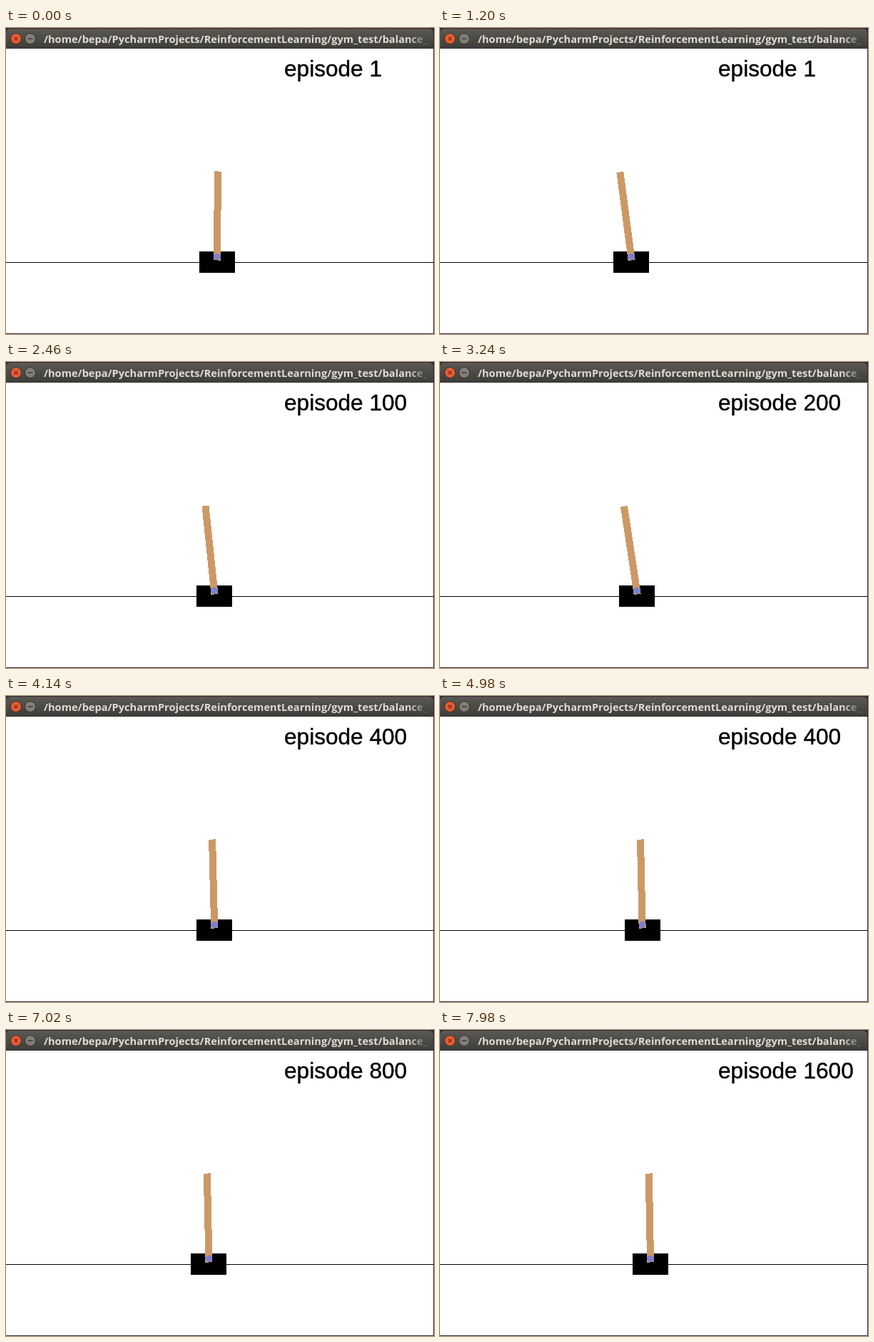
An HTML page that plays this animation: 600 by 430 pixels, repeating every 8 s.

```html
<!DOCTYPE html>
<html lang="en">
<head>
<meta charset="utf-8">
<title>Cart pole training</title>
<style>
  html, body { margin: 0; width: 100%; height: 100%; overflow: hidden; background: #fff; }
  svg { display: block; width: 600px; height: 430px; }
  .path { font: bold 14.6px "Open Sans", "Noto Sans", sans-serif; fill: #dfdbd2; }
  #label { font: 31.6px "Liberation Sans", Arial, sans-serif; stroke: #000; stroke-width: .4px; }
</style>
</head>
<body>
<svg viewBox="0 0 600 430">
  <defs>
    <linearGradient id="bar" x2="0" y2="1">
      <stop offset="0" stop-color="#5b5953"/>
      <stop offset="1" stop-color="#3d3c38"/>
    </linearGradient>
    <linearGradient id="fade">
      <stop offset=".94" stop-color="#fff"/>
      <stop offset=".992" stop-color="#000"/>
    </linearGradient>
    <mask id="fadeOut"><rect width="600" height="29" fill="url(#fade)"/></mask>
  </defs>

  <rect width="600" height="430" fill="#fff"/>

  <!-- Window frame -->
  <rect width="600" height="29" fill="#35242e"/>
  <path d="M0 29V7Q0 1 6 1H593Q599 1 599 7V29Z" fill="url(#bar)"/>
  <path d="M0 28.5H600" stroke="#33322e"/>
  <path d="M599.5 29V429.5H0" fill="none" stroke="#3b2a35"/>
  <g stroke="#33322e">
    <circle cx="14" cy="15" r="7.5" fill="#ec5b31"/>
    <path d="M11.5 12.5l5 5m0-5l-5 5" stroke="#7a2f18" stroke-width="1.3"/>
    <circle cx="34" cy="15" r="7.5" fill="#817e75"/>
    <path d="M30.5 15h7" stroke-width="1.3"/>
  </g>
  <g mask="url(#fadeOut)">
    <text class="path" x="53" y="21">/home/bepa/PycharmProjects/ReinforcementLearning/gym_test/balance_</text>
  </g>

  <text id="label" x="390" y="68"></text>

  <!-- Scene -->
  <g shape-rendering="crispEdges">
    <rect y="329" width="599" height="1"/>
    <g id="cart">
      <rect x="-25" y="314" width="50" height="30"/>
      <g id="pole">
        <rect x="-5" y="201.5" width="10" height="125" fill="#cc9966"/>
        <circle cy="321.5" r="5" fill="#8080cc"/>
      </g>
    </g>
  </g>
</svg>

<script>
const LOOP = 8000, STEP = 60, AXLE_Y = 321.5, SWAY_PERIOD = 15.5;

// The cart drifts between two positions; "fall" is how far the pole tips in radians.
// Episodes without a fall keep the pole balanced.
const episodes = [
  { number: 1, start: 0, from: 296, to: 254.5, fall: -.205 },
  { number: 10, start: 27, from: 297, to: 292, fall: -.205 },
  { number: 100, start: 36, from: 297, to: 288.7, fall: -.186 },
  { number: 200, start: 44, from: 298, to: 269, fall: -.208 },
  { number: 400, start: 57, from: 296, to: 279 },
  { number: 800, start: 90, from: 297.5, to: 273 },
  { number: 1600, start: 132, from: 295.5, to: 295 },
];
const lastStep = Math.floor(LOOP / STEP);

const [label, cart, pole] = ["label", "cart", "pole"].map(id => document.getElementById(id));

const sway = step => -.005 - .02 * Math.cos((step - 69) / SWAY_PERIOD * 2 * Math.PI);

function draw() {
  const step = Math.floor((performance.now() % LOOP) / STEP);
  const index = episodes.findLastIndex(e => e.start <= step);
  const { number, start, from, to, fall } = episodes[index];
  const end = index + 1 < episodes.length ? episodes[index + 1].start - 1 : lastStep;
  const progress = ((step - start) / (end - start)) ** 1.5;

  const x = from + (to - from) * progress;
  const angle = fall ? .008 + fall * progress : sway(step);

  label.textContent = `episode ${number}`;
  cart.setAttribute("transform", `translate(${x} 0)`);
  pole.setAttribute("transform", `rotate(${angle * 180 / Math.PI} 0 ${AXLE_Y})`);
  requestAnimationFrame(draw);
}
draw();
</script>
</body>
</html>
```
